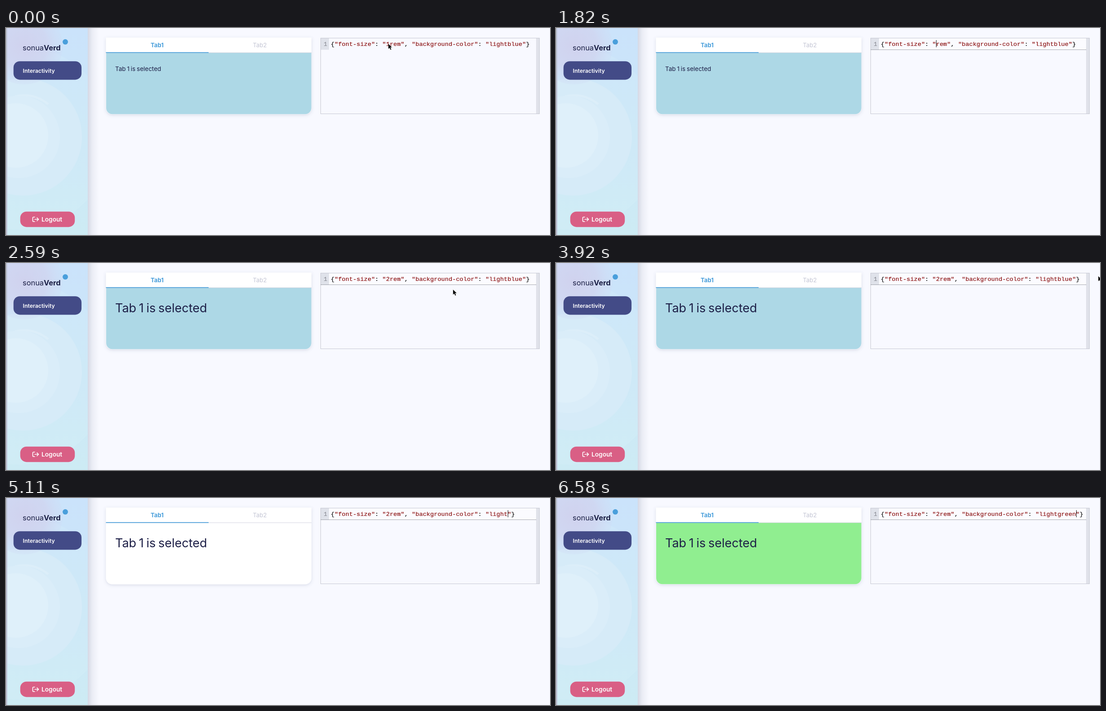
Recreate the animation shown at these times as an HTML page. Size 1211 by 462 pixels, loop 6790 ms.

```html
<!DOCTYPE html>
<html lang="en">
<head>
<meta charset="utf-8">
<title>Styled tabs</title>
<style>
  html, body { margin: 0; width: 100%; height: 100%; overflow: hidden; background: #f8f9ff; }
  svg { display: block; width: 1211px; height: 462px; font-family: Inter, "Open Sans", sans-serif; }
  .code { font: 13.67px "Liberation Mono", "Courier New", monospace; white-space: pre; }
  .label { font-weight: 600; fill: #fff; }
  #code { fill: #111; stroke: #111; stroke-width: .2; }
  #code .string { fill: #8c1212; stroke: #8c1212; }
</style>
</head>
<body>
<svg viewBox="0 0 1211 462">
  <defs>
    <linearGradient id="base" x1="0" y1="0" x2="0" y2="1">
      <stop offset="0" stop-color="#cbe3fb"/>
      <stop offset=".5" stop-color="#cbe6f7"/>
      <stop offset="1" stop-color="#cdebf4"/>
    </linearGradient>
    <radialGradient id="lavender">
      <stop offset="0" stop-color="#d0d2ee"/>
      <stop offset=".6" stop-color="#d0d5f0" stop-opacity=".85"/>
      <stop offset="1" stop-color="#cfdcf5" stop-opacity=".3"/>
    </radialGradient>
    <linearGradient id="edge">
      <stop offset="0" stop-color="#b4b8ca"/>
      <stop offset="1" stop-color="#c9d0e2"/>
    </linearGradient>
    <linearGradient id="sideShadow">
      <stop offset="0" stop-color="#d5d8e4"/>
      <stop offset=".4" stop-color="#ebedf5"/>
      <stop offset="1" stop-color="#f8f9ff"/>
    </linearGradient>
    <filter id="cardShadow" x="-5%" y="-10%" width="110%" height="125%">
      <feDropShadow dx="0" dy="2" stdDeviation="3.5" flood-color="#5a6a90" flood-opacity=".2"/>
    </filter>
    <clipPath id="sideClip"><path d="M3 0H182V462H3z"/></clipPath>
  </defs>

  <rect width="1211" height="462" fill="#f8f9ff"/>

  <!-- Sidebar -->
  <rect x="182" width="25" height="462" fill="url(#sideShadow)"/>
  <rect width="3" height="462" fill="url(#edge)"/>
  <g clip-path="url(#sideClip)">
    <rect x="3" width="179" height="462" fill="url(#base)"/>
    <circle cx="30" cy="245" r="205" fill="#d8edf8" opacity=".25"/>
    <circle cx="38" cy="243" r="131" fill="#d6ebf8"/>
    <circle cx="40" cy="40" r="86" fill="url(#lavender)"/>
    <path d="M20 153Q60 143 94 170" fill="none" stroke="#deeffa" stroke-width="5" opacity=".8"/>
    <circle cx="28" cy="243" r="92" fill="#daedf9"/>
    <circle cx="22" cy="240" r="72" fill="#dff0fa"/>
  </g>
  <circle cx="132" cy="31" r="6" fill="#4a9fdb"/>
  <text x="37" y="50" font-size="16.4" fill="#1b1f45">sonua<tspan font-weight="700">Verd</tspan></text>
  <rect x="16.7" y="74.2" width="151.4" height="41.2" rx="14" fill="#434b87"/>
  <text class="label" x="37.5" y="99.5" font-size="12.3">Interactivity</text>
  <rect x="31.7" y="409.7" width="121.5" height="34.5" rx="14" fill="#d95f85"/>
  <path d="M64 422H61.5Q59.5 422 59.5 424V430Q59.5 432 61.5 432H64M64 427H72M69 423.5L72.5 427L69 430.5"
        fill="none" stroke="#fff" stroke-width="1.7" stroke-linecap="round" stroke-linejoin="round"/>
  <text class="label" x="79" y="432" font-size="13.7">Logout</text>

  <!-- Tab card -->
  <path d="M222.5 21.5H680V178.5a14 14 0 0 1-14 14H236.5a14 14 0 0 1-14-14z" fill="#fff" filter="url(#cardShadow)"/>
  <path id="panel" d="M223 55H679.7V178.5a13.7 13.7 0 0 1-13.7 13.7H236.7a13.7 13.7 0 0 1-13.7-13.7z"/>
  <rect x="222.5" y="54.6" width="457.5" height="1" fill="#d2d4df"/>
  <rect x="222.5" y="53.9" width="228.5" height="1.7" fill="#4a9fdb"/>
  <g font-size="13.2" text-anchor="middle">
    <text x="336.5" y="43" font-weight="700" fill="#4a9fdb">Tab1</text>
    <text x="565" y="43" fill="#c3c5d4">Tab2</text>
  </g>
  <text id="message" x="243" word-spacing="-.07em" fill="#1c1e46">Tab 1 is selected</text>

  <!-- Editor -->
  <rect x="701" y="23" width="18" height="25.5" fill="#dfe2ea"/>
  <rect x="1180" y="22" width="8" height="170" fill="#e0e2ea"/>
  <g id="activeLine">
    <rect x="719" y="23" width="461" height="25" fill="#fbfbff"/>
    <path d="M701 48.5H1180" stroke="#55575f" stroke-dasharray="1 1"/>
  </g>
  <rect x="700.5" y="22.5" width="487" height="169" fill="none" stroke="#c6c8d1"/>
  <text class="code" x="707" y="39.5" fill="#85878f">1</text>
  <text class="code" id="code" x="723" y="39.5"></text>
  <rect id="caret" y="27" width="1" height="16" fill="#111"/>

  <!-- Pointers, both with their hot spot at 0,0 -->
  <path id="arrow" d="M0 0V12L2.8 9.4L4.8 14L7 13L5 8.6H8.7z" fill="#000" stroke="#fff" stroke-width=".5"/>
  <path id="beam" d="M-3 -7.5Q0 -7.5 0 -5.5Q0 -7.5 3 -7.5M0 -5.5V5.5M-3 7.5Q0 7.5 0 5.5Q0 7.5 3 7.5"
        fill="none" stroke="#222" stroke-width="1.1"/>
</svg>
<script>
  const LOOP = 6790, STEP = 70, CHAR = 8.2;
  const $ = id => document.getElementById(id);

  // time, size digit, colour name, field holding the caret
  const edits = [
    [0, '1', 'lightblue', ''],
    [770, '1', 'lightblue', 'size'],
    [1750, '', 'lightblue', 'size'],
    [1890, '2', 'lightblue', 'size'],
    [3430, '2', 'lightblue', 'color'],
    [4340, '2', 'lightblu', 'color'],
    [4550, '2', 'lightbl', 'color'],
    [4690, '2', 'lightb', 'color'],
    [5040, '2', 'light', 'color'],
    [5740, '2', 'lightg', 'color'],
    [5880, '2', 'lightgr', 'color'],
    [6090, '2', 'lightgre', 'color'],
    [6230, '2', 'lightgree', 'color'],
    [6440, '2', 'lightgreen', 'color']
  ];
  const panelFills = [[0, '#add8e6'], [4480, '#ffffff'], [6580, '#90ee90']];
  const pointerKinds = [
    [0, 'arrow'], [420, 'beam'], [1680, 'none'], [2380, 'beam'], [2450, 'arrow'],
    [3080, 'beam'], [3640, 'arrow'], [4270, 'none']
  ];
  const pointerPath = [
    [0, 851, 35], [350, 851, 35], [560, 856, 35], [840, 856, 35], [980, 874, 34],
    [2310, 874, 34], [2590, 995, 59], [2730, 1092, 62], [2800, 1092, 62],
    [3150, 1152, 36], [3500, 1152, 35], [3710, 1207, 29], [LOOP, 1207, 29]
  ];

  const latest = (rows, t) => rows.filter(row => row[0] <= t).pop();
  const show = (id, on) => $(id).setAttribute('visibility', on ? 'visible' : 'hidden');

  function pointerAt(t) {
    const i = pointerPath.findIndex(p => p[0] > t);
    const [t0, x0, y0] = pointerPath[i - 1], [t1, x1, y1] = pointerPath[i];
    const k = (t - t0) / (t1 - t0);
    return [x0 + (x1 - x0) * k, y0 + (y1 - y0) * k];
  }

  function drawEditor(t) {
    const [since, size, color, field] = latest(edits, t);
    const toSize = `{"font-size": "${size}`;
    const toColor = `${toSize}rem", "background-color": "${color}`;
    $('code').innerHTML = `${toColor}"}`.replace(/"[^"]*"/g, s => `<tspan class='string'>${s}</tspan>`);
    const column = (field === 'size' ? toSize : toColor).length;
    $('caret').setAttribute('x', Math.round(723 + column * CHAR));
    show('caret', field && (t - since + 110) % 1200 < 600);
    show('activeLine', t >= 700);
  }

  function drawPanel(t) {
    const large = t >= 2030;
    $('panel').setAttribute('fill', latest(panelFills, t)[1]);
    $('message').setAttribute('font-size', large ? 27 : 13.5);
    $('message').setAttribute('y', large ? 109.5 : 96);
  }

  function drawPointer(t) {
    const kind = latest(pointerKinds, t)[1];
    const place = `translate(${pointerAt(t)})`;
    for (const id of ['arrow', 'beam']) {
      $(id).setAttribute('transform', place);
      show(id, id === kind);
    }
  }

  function render(time) {
    const t = Math.floor(time % LOOP / STEP) * STEP;
    drawEditor(t);
    drawPanel(t);
    drawPointer(t);
  }

  const start = performance.now();
  function tick() {
    render(performance.now() - start);
    requestAnimationFrame(tick);
  }
  tick();
</script>
</body>
</html>
```
